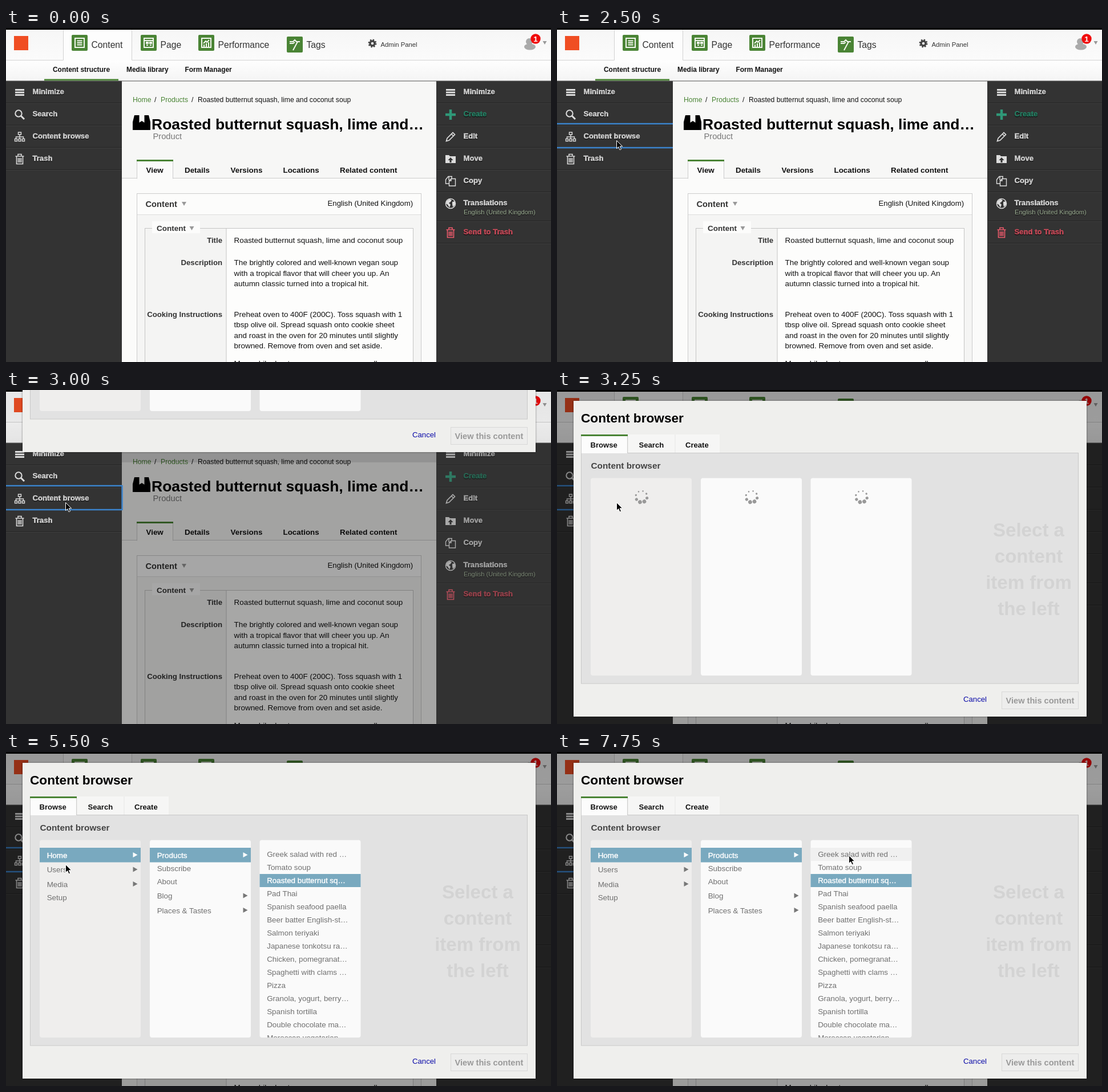
Animation, 955 px wide and 586 px high, one loop 8000 ms. Source, as an HTML page:

```html
<!DOCTYPE html>
<html lang="en">
<head>
<meta charset="utf-8">
<title>Content browser</title>
<style>
html, body { margin: 0; width: 100%; height: 100%; overflow: hidden; background: #333; }
svg { display: block; font-family: "Liberation Sans", Arial, sans-serif; }
text { white-space: pre; }
.side text { text-shadow: 0 1px 1px #000; }
</style>
</head>
<body>
<svg id="stage" width="955" height="586" viewBox="0 0 955 586"></svg>
<script>
const esc = s => s.replace(/&/g, '&amp;');
const text = (x, y, size, s, fill = '#111', more = '') =>
  `<text x="${x}" y="${y}" font-size="${size}" fill="${fill}" ${more}>${esc(s)}</text>`;
const bold = (x, y, size, s, fill, more = '') => text(x, y, size, s, fill, 'font-weight="700" ' + more);
const rect = (x, y, w, h, fill, more = '') =>
  `<rect x="${x}" y="${y}" width="${w}" height="${h}" fill="${fill}" ${more}/>`;
const path = (d, fill, more = '') => `<path d="${d}" fill="${fill}" ${more}/>`;
const line = (d, stroke, width = 1, more = '') => path(d, 'none', `stroke="${stroke}" stroke-width="${width}" ${more}`);
const at = (x, y, body, more = '') => `<g transform="translate(${x} ${y})" ${more}>${body}</g>`;
const down = (x, y) => path(`M${x} ${y}h8l-4 7z`, '#999');
const GREEN = '#4a8435';

// Icons, drawn around their own centre
const icons = {
  menu: c => line('M-8 -4.5H8M-8 0H8M-8 4.5H8', c, 3),
  search: c => `<circle cx="-2" cy="-2" r="5.7" fill="none" stroke="${c}" stroke-width="2"/>` + line('M2.5 2.5L8 8', c, 3),
  tree: c => line('M-2.5 -8h5v4h-5zM0 -4V3M-6.5 3V0H6.5V3M-8.5 3.5h4v4h-4zM-2 3.5h4v4h-4zM4.5 3.5h4v4h-4z', c, 1.4),
  trash: c => line('M-5.5 -4.5V8.5H5.5V-4.5M-7.5 -5H7.5M-3 -6V-8.5H3V-6M-2.5 -2V6M0 -2V6M2.5 -2V6', c, 1.6),
  plus: c => line('M-9 0H9M0 -9V9', c, 4.5),
  pencil: c => line('M-7.5 7.5L-6 2.5L4 -7.5L7.5 -4L-2.5 6ZM1.5 -5L5 -1.5', c, 1.7),
  folder: c => path('M-9 -7h6l2 2H9V7H-9Z', c) + path('M0 -3l4.5 5h-3v4h-3v-4h-3z', '#333'),
  copy: c => line('M-3 -2V-8.5H3M-3 4H-8.5V-3L-4 -8.5H2V-4M1 -4.5H8.5V8H-2.5V-1ZM1 -4V-1H-2', c, 1.4),
  globe: c => `<circle r="8.5" fill="none" stroke="${c}" stroke-width="1.5"/>` +
    path('M-7 -4L-2 -8L2 -6L0 -3L-3 -1L0 2L-2 7L-5 2L-8 0ZM3 -3L8 -4L8 2L4 6L3 1Z', c),
};

function sidebar(x, width, items) {
  let y = 93, out = rect(x, 93, width, 493, '#333');
  for (const [icon, label, color = '#fff', sub] of items) {
    out += at(x + 24, y + 20, icons[icon](color === '#fff' ? '#ddd' : color));
    out += bold(x + 46.5, y + 22.5, 13.1, label, color, `stroke="${color}" stroke-width=".4"`);
    if (sub) out += text(x + 47, y + 38.5, 11.1, sub, '#9eb095');
    y += sub ? 51 : 39;
    out += rect(x, y - 1, width, 1, '#242424') + rect(x, y, width, 1, '#3f3f3f');
  }
  return `<g class="side">${out}</g>`;
}

function navIcon(x, y, d) {
  return rect(x, y, 28, 28, GREEN, 'rx="2"') + at(x + 14, y + 14, line(d, '#f2f6ee', 2));
}

function header() {
  let out = rect(0, 0, 955, 93, 'url(#bar)') + rect(100, 3, 121, 54, '#fdfdfd') + rect(0, 0, 955, 3, '#000');
  out += line('M0 56.5H100.5V3M220.5 3V56.5H955', '#d2d2d2');
  out += rect(14, 14, 25, 25, '#f04e23');
  out += navIcon(115, 12, 'M-8 -8H8V8H-8ZM-4.5 -3.5H4.5M-4.5 0H4.5M-4.5 3.5H4.5');
  out += navIcon(236, 12, 'M-8 -8H8V8H-8ZM-8 -4H8M-4 -1H-1V1H-4ZM2 -1H5V1H2ZM-4 4H-1M2 4H5');
  out += navIcon(337, 12, 'M-8 -8H8V8H-8ZM-4 7V3M0 7V1M4 7V-1M-5 1L-1 -3L1 -1L5 -5');
  out += navIcon(492, 15, 'M-9 -5H-3L0 -8L3 -5H9M5 -5L-3 10M-9 -2H-3L0 -4');
  [[150, 'Content'], [271, 'Page'], [372, 'Performance'], [527, 'Tags']]
    .forEach(([x, s]) => out += text(x - 0.5, 34.5, 15.7, s, '#333'));
  out += at(642, 27, `<circle r="4" fill="none" stroke="#444" stroke-width="3.5"/>` +
    `<circle r="6.2" fill="none" stroke="#444" stroke-width="2.5" stroke-dasharray="2.43"/>`);
  out += text(656.5, 32.5, 11.3, 'Admin Panel', '#333');
  out += `<circle cx="917" cy="24" r="6" fill="#aaa"/><ellipse cx="918" cy="33" rx="10" ry="5.5" fill="#aaa"/>`;
  out += `<circle cx="928" cy="19" r="8.7" fill="#f00a0a"/>` + bold(928, 24, 13.5, '1', '#fff', 'text-anchor="middle"');
  out += path('M940.5 23h7l-3.5 6z', '#999');
  [[82, 'Content structure'], [211, 'Media library'], [313.5, 'Form Manager']]
    .forEach(([x, s]) => out += bold(x, 77, 11.95, s));
  return out + rect(67, 89.5, 130, 3, GREEN) + rect(0, 92.5, 955, 1, '#555');
}

function article() {
  const soup = 'Roasted butternut squash, lime and coconut soup';
  let out = rect(203, 93, 551, 493, '#f7f7f6') + rect(203, 264, 551, 322, '#fbfbfa');
  out += text(222, 130, 12.2, 'Home', GREEN) + text(260, 130, 12.2, '/') + text(271, 130, 12.2, 'Products', GREEN);
  out += text(325, 130, 12.2, '/') + text(336, 130, 12.2, soup);
  out += path('M225 153H250L253 165V179H222V165Z', '#000') + path('M233.5 153H242.5V166L238 163L233.5 166Z', '#f7f7f6');
  out += bold(255, 178, 26.5, 'Roasted butternut squash, lime and…', '#000') + text(257.5, 194.5, 14.7, 'Product', '#777');
  out += line('M203 263.5H754', '#ccc') + path('M229.5 264.5V232H292.5V264.5', '#fbfbfa', 'stroke="#ccc"') + rect(229, 231, 64, 3, GREEN);
  [[245.5, 'View'], [313, 'Details'], [393.5, 'Versions'], [485.5, 'Locations'], [585, 'Related content']]
    .forEach(([x, s]) => out += bold(x, 254, 13.4, s));
  out += rect(229.5, 290.5, 498, 310, '#f5f5f4', 'stroke="#ccc"') + rect(230, 291, 497, 36, '#fcfcfb') + rect(230, 327, 497, 1, '#ddd');
  out += bold(244.5, 314, 14.7, 'Content', '#333') + down(308, 305) + text(563.5, 312, 13.2, 'English (United Kingdom)');
  out += rect(243.5, 351.5, 470, 250, '#fdfdfc', 'stroke="#c4c4c4"') + rect(244, 352, 142, 240, '#f4f4f3') + rect(385.5, 352, 1, 240, '#c4c4c4');
  out += rect(256, 339, 84, 21, '#fcfcfb') + bold(264, 355.5, 13.5, 'Content', '#333') + down(321.5, 348);
  const field = (y, label, lines) => {
    out += bold(379, y, 13.2, label, '#333', 'text-anchor="end"');
    lines.forEach((s, i) => out += text(399.5, y + i * 18.6, 13.45, s));
  };
  field(376.5, 'Title', [soup]);
  field(416, 'Description', ['The brightly colored and well-known vegan soup',
    'with a tropical flavor that will cheer you up. An', 'autumn classic turned into a tropical hit.']);
  field(506.5, 'Cooking Instructions', ['Preheat oven to 400F (200C). Toss squash with 1',
    'tbsp olive oil. Spread squash onto cookie sheet', 'and roast in the oven for 20 minutes until slightly',
    'browned. Remove from oven and set aside.']);
  return out + text(399.5, 593, 13.45, 'Meanwhile, heat one saucepan over small');
}

const columns = [
  { x: 59, fill: '#efeeed', loaded: 3750, selected: 0, items: ['Home>', 'Users>', 'Media>', 'Setup'] },
  { x: 252, fill: '#fafafa', loaded: 4250, selected: 0, items: ['Products>', 'Subscribe', 'About', 'Blog>', 'Places & Tastes>'] },
  { x: 444.5, fill: '#fafafa', loaded: 5250, selected: 2, items: ['Greek salad with red …', 'Tomato soup', 'Roasted butternut sq…',
    'Pad Thai', 'Spanish seafood paella', 'Beer batter English-st…', 'Salmon teriyaki', 'Japanese tonkotsu ra…',
    'Chicken, pomegranat…', 'Spaghetti with clams …', 'Pizza', 'Granola, yogurt, berry…', 'Spanish tortilla',
    'Double chocolate ma…', 'Moroccan vegetarian …'] },
];

function column({ x, fill, selected, items }, i) {
  let y = 168, list = i === 2 ? rect(x, 168, 177, 23, '#f0f0f0', 'id="hover"') : '';
  items.forEach((item, n) => {
    const folder = item.endsWith('>'), h = folder ? 25.5 : 23, on = n === selected;
    if (on) list += rect(x, y, 177, h, '#79a9bf');
    list += text(x + 12.7, y + h / 2 + (folder ? 5 : 4), 13.4, item.replace('>', ''), on ? '#fff' : '#707070',
      on ? 'stroke="#fff" stroke-width=".4"' : '');
    if (folder) list += path(`M${x + 163.5} ${y + 8}l8 4.5l-8 4.5z`, on ? '#fff' : '#777');
    y += h;
  });
  let dots = '';
  for (let k = 0; k < 8; k++) {
    const a = k * Math.PI / 4, r = 1.3 + 2.2 * ((1 + Math.cos(a - 0.4)) / 2) ** 1.5;
    dots += `<circle cx="${10 * Math.cos(a)}" cy="${10 * Math.sin(a)}" r="${r}"/>`;
  }
  return rect(x, 154.5, 177, 346.5, fill, 'rx="4"') + `<g id="list${i}" clip-path="url(#fold)">${list}</g>` +
    at(x + 89, 187, `<g id="spin${i}" fill="#999">${dots}</g>`);
}

function modal() {
  let out = rect(29, 19, 899, 554, '#efefed', 'filter="url(#shadow)"');
  out += bold(42, 56.5, 22.65, 'Content browser', '#000');
  out += rect(125, 78, 81, 32, '#f6f6f5') + rect(208, 78, 77, 32, '#f6f6f5');
  out += rect(42.5, 110.5, 871, 404.5, '#e2e2e2', 'stroke="#c8c8c8"');
  out += path('M42.5 111V79H123.5V111', '#fcfcfc', 'stroke="#ccc"') + rect(42, 78, 82, 3, GREEN);
  [[58.5, 'Browse'], [143.5, 'Search'], [225, 'Create']].forEach(([x, s]) => out += bold(x, 101, 13.1, s, '#111'));
  out += bold(59.5, 138, 15.35, 'Content browser', '#444') + columns.map(column).join('');
  ['Select a', 'content', 'item from', 'the left'].forEach((s, i) =>
    out += bold(826.5, 257 + i * 46, 33.1, s, '#d3d3d3', 'text-anchor="middle"'));
  out += text(712, 547, 13.2, 'Cancel', '#0a0aa8');
  return out + rect(779.5, 529.5, 134, 30, '#ededec', 'stroke="#d8d8d8"') + bold(786.5, 550, 14.6, 'View this content', '#999');
}

// Half-way state of the backdrop: each region fades at its own rate
const fading = rect(0, 0, 955, 93, '#000', 'opacity=".07"') + rect(203, 93, 551, 493, '#000', 'opacity=".34"') +
  rect(203, 109, 551, 18, '#000', 'opacity=".1"') + rect(754, 93, 201, 493, '#303030', 'opacity=".3"');

const stage = document.getElementById('stage');
stage.innerHTML = `<defs>
  <linearGradient id="bar" x2="0" y2="1"><stop stop-color="#f6f6f6"/><stop offset=".6" stop-color="#fbfbfb"/>
  <stop offset=".62" stop-color="#fefefe"/><stop offset="1" stop-color="#f4f4f4"/></linearGradient>
  <filter id="shadow"><feDropShadow dx="0" dy="0" stdDeviation="1.5" flood-opacity=".5"/></filter>
  <clipPath id="fold"><rect x="40" y="154" width="600" height="347"/></clipPath></defs>` +
  article() +
  sidebar(0, 203, [['menu', 'Minimize'], ['search', 'Search'], ['tree', 'Content browse'], ['trash', 'Trash']]) +
  sidebar(755, 200, [['menu', 'Minimize'], ['plus', 'Create', '#2f9878'], ['pencil', 'Edit'], ['folder', 'Move'], ['copy', 'Copy'],
    ['globe', 'Translations', '#fff', 'English (United Kingdom)'], ['trash', 'Send to Trash', '#ef5b6c']]) +
  header() +
  `<g id="fading">${fading}</g>` +
  line('M0 168H203M0 210H203', '#3b83cc', 2.5, 'id="focus"') + line('M203.5 167V211', '#3b83cc', 2.5, 'id="focusEnd"') +
  rect(0, 0, 955, 586, '#000', 'id="dim" opacity=".38"') +
  `<g id="modal">${modal()}</g>` +
  `<g id="cursor">${path('M0 0V14L3.3 11L5.5 16.3L8 15.2L5.7 10.2H10.2Z', '#000', 'stroke="#fff" stroke-width="1"')}</g>`;

const el = id => document.getElementById(id);
const show = (id, on) => el(id).setAttribute('display', on ? 'inline' : 'none');
const STEP = 250, LOOP = 8000;

// Pointer positions: time, x, y; each holds until the next
const pointer = [[250, 390, 206], [500, 300, 204], [750, 170, 190], [1000, 89, 177], [1250, 112, 200],
  [1500, 184, 284], [1750, 130, 230], [2000, 104.5, 197.5], [5750, 150, 197], [6000, 188.5, 193.5],
  [6750, 270, 202], [7000, 390, 208], [7250, 520, 212], [7500, 604, 210], [7750, 511.5, 181.5]];

function draw(now) {
  const t = Math.floor(now % LOOP / STEP) * STEP;
  const spot = pointer.filter(p => p[0] <= t).pop();
  show('cursor', spot);
  if (spot) el('cursor').setAttribute('transform', `translate(${spot[1]} ${spot[2]})`);

  const sliding = t === 3000, open = t >= 3250;
  show('focus', t >= 2500);
  show('focusEnd', t >= 2750);
  show('fading', sliding);
  show('dim', open);
  show('modal', sliding || open);
  el('modal').setAttribute('transform', `translate(0 ${sliding ? -464 : 0})`);

  columns.forEach(({ loaded }, i) => {
    show('list' + i, t >= loaded);
    show('spin' + i, t < loaded);
    el('spin' + i).setAttribute('transform', `rotate(${56 * (t - 3250) / STEP + 60})`);
  });
  show('hover', t >= 7750);
}

const start = performance.now();
function tick() {
  draw(performance.now() - start);
  requestAnimationFrame(tick);
}
tick();
</script>
</body>
</html>
```
